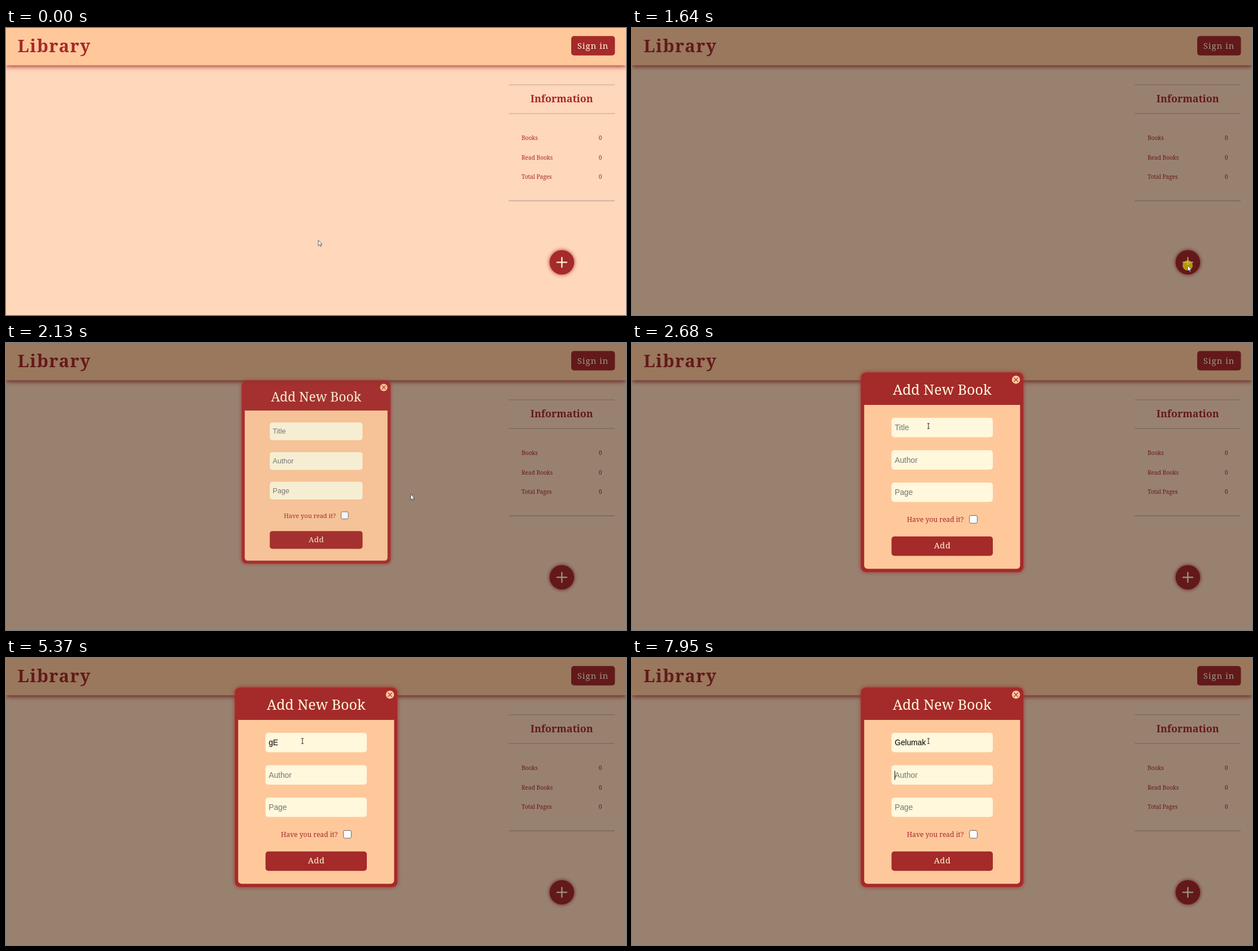
Recreate the animation shown at these times as an HTML page. Size 1098 by 510 pixels, loop 8 s.

```html
<!DOCTYPE html>
<html lang="en">
<head>
<meta charset="utf-8">
<title>Library</title>
<style>
  html, body { margin: 0; width: 100%; height: 100%; overflow: hidden; background: #ffd7ba; }
  svg { display: block; width: 1098px; height: 510px; font-family: "Noto Serif", serif; }
  .brown { fill: #a52a2a; }
  .cream { fill: #fff8dc; }
  .peach { fill: #ffc89b; }
  .bold { font-weight: 700; }
  .small { font-size: 10.1px; }
  .field { font: 13.8px "Liberation Sans", Arial, sans-serif; fill: #757575; }
  .mid { text-anchor: middle; }
  .end { text-anchor: end; }
  .glow { filter: drop-shadow(0 0 3.5px #a52a2a); }
</style>
</head>
<body>
<svg viewBox="0 0 1098 510">
  <rect width="1098" height="510" fill="#ffd7ba"/>

  <rect class="peach" width="1098" height="66.3" style="filter: drop-shadow(0 2px 4px #a52a2a)"/>
  <text class="brown bold" x="20.5" y="42.5" font-size="31" letter-spacing="1.5">Library</text>
  <rect class="brown" x="1001" y="14.3" width="77.4" height="34.5" rx="5"/>
  <text class="cream" x="1011.8" y="36.8" font-size="15" letter-spacing=".9">Sign in</text>

  <path d="M890.4 101H1078M890.4 152H1078M890.4 307.2H1078" stroke="#b9a294" stroke-width="1.2"/>
  <text class="brown bold mid" x="984.2" y="132.3" font-size="17.8">Information</text>
  <g class="brown small">
    <text x="913" y="199">Books</text><text class="end" x="1055.3" y="199">0</text>
    <text x="913" y="233.5">Read Books</text><text class="end" x="1055.3" y="233.5">0</text>
    <text x="913" y="268">Total Pages</text><text class="end" x="1055.3" y="268">0</text>
  </g>

  <g id="plus">
    <circle class="brown glow" r="21.7"/>
    <path d="M-8.6 0H8.6M0-8.6V8.6" stroke="#fff8dc" stroke-width="2.3" stroke-linecap="round"/>
  </g>

  <rect id="shade" width="1098" height="510" opacity=".4"/>

  <g id="dialog">
    <rect class="brown glow" x="405.4" y="52.4" width="287.6" height="354.6" rx="9"/>
    <path class="peach" d="M411.2 110H687.3V395.3a6 6 0 0 1-6 6H417.2a6 6 0 0 1-6-6Z"/>
    <text class="cream mid" x="549.2" y="92" font-size="25">Add New Book</text>
    <circle class="peach" cx="680" cy="65.2" r="7.2"/>
    <path d="M676.4 61.6l7.2 7.2m0-7.2l-7.2 7.2" stroke="#a52a2a" stroke-width="1.2"/>
    <g class="cream">
      <rect x="459.6" y="133" width="179.4" height="34.4" rx="5"/>
      <rect x="459.6" y="190.6" width="179.4" height="34.4" rx="5"/>
      <rect x="459.6" y="248.1" width="179.4" height="34.4" rx="5"/>
    </g>
    <text class="field" id="title" x="465.2" y="155"></text>
    <text class="field" x="465.2" y="212.6">Author</text>
    <text class="field" x="465.2" y="270.1">Page</text>
    <text class="brown" x="486.8" y="318" font-size="12.05">Have you read it?</text>
    <rect x="597.6" y="306.4" width="13.8" height="13.8" rx="2.4" fill="#fff" stroke="#666"/>
    <rect class="brown" x="459.6" y="343.8" width="179.4" height="34.4" rx="5"/>
    <text class="cream mid" x="549.6" y="365.2" font-size="14.5" letter-spacing=".7">Add</text>
    <rect id="caret" width="1" height="16"/>
  </g>

  <rect id="list" x="468" y="172" width="174" height="85" rx="4" fill="#fff"
        style="filter: drop-shadow(0 1px 1.5px #0005)"/>
  <circle id="click" r="9" fill="#decb04" opacity=".7"/>

  <g id="pointer" fill="#fff" stroke="#222" stroke-width=".7" stroke-linejoin="round">
    <path id="arrow" d="M0 0V10L2.3 7.9 3.9 11.4 5.5 10.7 4 7.3H7.1Z"/>
    <path id="hand" d="M-1 .8Q0-.6 1 .8V4.6Q2 3.8 2.9 5 3.9 4.3 4.6 5.4 5.8 5 6 6.4V9.2L4.7 13H-.6L-3.7 8.3Q-4.2 6.6-2.6 6.8L-1 8.2Z"/>
    <path id="beam" d="M-2-4.5H2M0-4.5V4.5M-2 4.5H2" stroke-width="1"/>
  </g>
</svg>
<script>
const LOOP = 8000, OPEN = 1640;
const $ = id => document.getElementById(id);
const [plus, shade, dialog, title, caret, list, click, pointer, arrow, hand, beam] =
  ['plus', 'shade', 'dialog', 'title', 'caret', 'list', 'click', 'pointer', 'arrow', 'hand', 'beam'].map($);

// Pointer keys: time, x, y
const path = [
  [0, 553, 377], [390, 553, 377], [640, 720, 358], [860, 852, 373], [1140, 984, 421.5],
  [1700, 984, 422], [1990, 813, 325], [2400, 531, 160], [2680, 525, 147.5], [LOOP, 525, 147.5]
];

// Typing keys: time, title text, caret shown
const typing = [
  [0, '', 0], [3080, '', 1], [3680, '', 0], [4140, '', 1], [4340, 'g', 1], [4820, 'gE', 1],
  [5370, 'gE', 0], [5570, 'g', 0], [5700, '', 0], [5900, '', 1], [5970, 'G', 1], [6370, 'Ge', 1],
  [6630, 'Gel', 1], [6760, 'Gelu', 1], [6960, 'Gelum', 1], [7220, 'Geluma', 1], [7550, 'Gelumak', 1]
];

const show = (el, on) => el.style.display = on ? '' : 'none';
const ramp = (t, a, b) => Math.min(1, Math.max(0, (t - a) / (b - a)));

// The CSS "ease" curve, solved by bisection
function ease(x) {
  const bez = (a, b, s) => 3 * a * s * (1 - s) ** 2 + 3 * b * s * s * (1 - s) + s ** 3;
  let lo = 0, hi = 1;
  for (let i = 0; i < 20; i++) {
    const s = (lo + hi) / 2;
    if (bez(.25, .25, s) < x) lo = s; else hi = s;
  }
  return bez(.1, 1, lo);
}

function place(t) {
  const i = path.findIndex(k => k[0] > t);
  const [a, b] = [path[i - 1], path[i]];
  const p = ramp(t, a[0], b[0]);
  return [a[1] + (b[1] - a[1]) * p, a[2] + (b[2] - a[2]) * p];
}

function drawTitle(t) {
  const [, text, on] = typing.findLast(k => k[0] <= t);
  const next = t >= 7950;
  title.textContent = text || 'Title';
  title.style.fill = text ? '#000' : '';
  const width = text && !next ? title.getComputedTextLength() : 0;
  caret.setAttribute('x', 465 + Math.round(width));
  caret.setAttribute('y', next ? 200.5 : 142.5);
  show(caret, on);
}

function draw(t) {
  const open = t >= OPEN;
  const [x, y] = place(t);

  const grow = open ? 0 : ease(ramp(t, 1090, 1300));
  plus.setAttribute('transform', `translate(984.4 416.4) scale(${1 + .1 * grow})`);

  show(shade, open);
  show(dialog, open);
  const e = ease(ramp(t, 1610, 2410));
  dialog.setAttribute('transform', `translate(549.2 229.7) scale(${e}) translate(-549.2 -229.7)`);
  dialog.setAttribute('opacity', e);
  if (open) drawTitle(t);

  const listed = ramp(t, 3100, 3260) * (1 - ramp(t, 4330, 4530));
  list.setAttribute('opacity', listed);
  show(list, listed > 0);

  pointer.setAttribute('transform', `translate(${x} ${y})`);
  const overPlus = !open && t >= 1090, overField = t >= 2385;
  show(hand, overPlus);
  show(beam, overField);
  show(arrow, !overPlus && !overField);

  click.setAttribute('cx', x);
  click.setAttribute('cy', y);
  show(click, t >= 1500 && t < 1720 || t >= 3080 && t < 3280);
}

let start;
function tick(now) {
  start ??= now;
  draw((now - start) % LOOP);
  requestAnimationFrame(tick);
}
draw(0);
requestAnimationFrame(tick);
</script>
</body>
</html>
```
